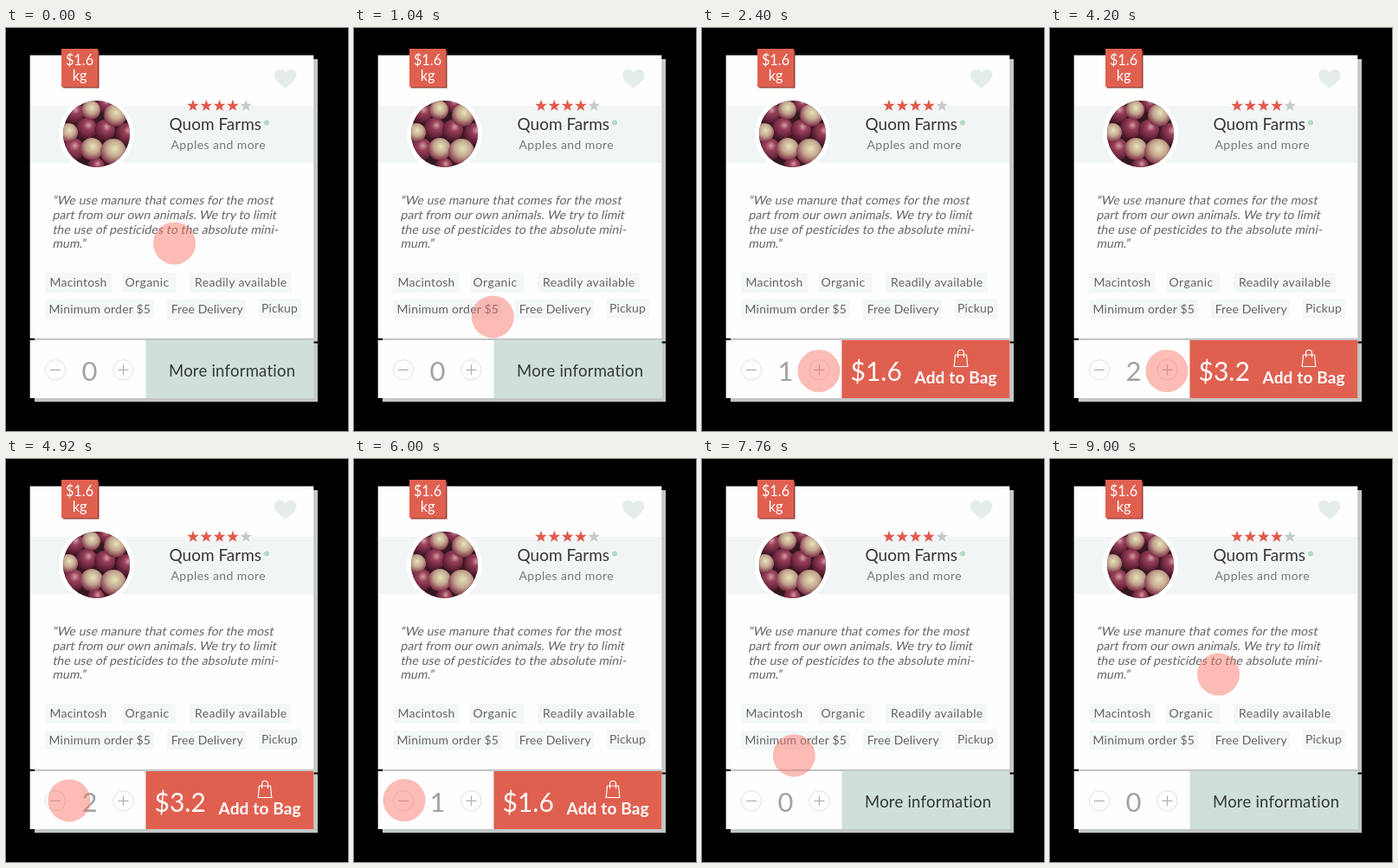
These frames come from a looping animation (395x466 px, 9.04 s). An HTML page:

```html
<!DOCTYPE html>
<html lang="en">
<head>
<meta charset="utf-8">
<title>Product card</title>
<style>
html, body { margin: 0; width: 100%; height: 100%; overflow: hidden; background: #000; }
svg { display: block; width: 395px; height: 466px; font-family: Lato, sans-serif; }
</style>
</head>
<body>
<svg id="stage" viewBox="0 0 395 466" xmlns="http://www.w3.org/2000/svg">
  <defs>
    <clipPath id="round"><circle cx="104.5" cy="122.5" r="38.5"/></clipPath>
    <radialGradient id="red" cx=".6" cy=".35" r=".62">
      <stop offset="0" stop-color="#d3a0a4"/>
      <stop offset=".35" stop-color="#98405a"/>
      <stop offset="1" stop-color="#551a30"/>
    </radialGradient>
    <radialGradient id="pale" cx=".55" cy=".38" r=".62">
      <stop offset="0" stop-color="#e6e3b8"/>
      <stop offset=".5" stop-color="#c4a690"/>
      <stop offset="1" stop-color="#7a2a42"/>
    </radialGradient>
  </defs>
  <rect width="395" height="466"/>

  <!-- card: two shadows, two sheets -->
  <path fill="#c3c7c6" d="M33 364.5H360V432.3H33ZM33 36H360V362.5H33Z"/>
  <path fill="#fefefe" d="M27.700 361H355.300V428H27.700ZM27.700 31.400H355.300V358.800H27.700Z"/>
  <path fill="#f2f5f6" d="M28 90H355V156H28Z"/>

  <!-- price tag -->
  <path fill="#8f4037" d="M66 26H107.500V69.600H66Z"/>
  <path fill="#e06050" d="M64 24H106V68.300H64Z"/>
  <g fill="#fff" font-size="16.3" text-anchor="middle">
    <text x="85" y="42.700">$1.6</text>
    <text x="85" y="61">kg</text>
  </g>

  <!-- round picture -->
  <circle cx="104.5" cy="122.5" r="43.5" fill="#fff"/>
  <g id="fruit" clip-path="url(#round)"><rect x="64" y="82" width="82" height="82" fill="#35181f"/></g>

  <path fill="#e5ecec" d="M322.7 70C317 65 310 60.500 310 54.300C310 46.800 319.300 45.300 322.700 51.500C326.100 45.300 335.400 46.800 335.400 54.300C335.400 60.500 328.400 65 322.700 70Z"/>
  <g id="stars"></g>
  <circle cx="301" cy="109.500" r="3" fill="#b0dcc2"/>

  <g id="labels"></g>

  <!-- stepper -->
  <g fill="none" stroke="#dde0e1">
    <circle cx="57" cy="395.300" r="11.7"/>
    <circle cx="135.500" cy="395.300" r="11.7"/>
    <path stroke="#b2afae" stroke-width="1.2" d="M51 395.300H63M129.500 395.300H141.500M135.500 389.300V401.300"/>
  </g>
  <g fill="#a0a3a4" font-size="31" text-anchor="middle">
    <text id="n0" x="96.500" y="407.500">0</text>
    <text id="n1" x="96.500" y="407.500">1</text>
    <text id="n2" x="96.500" y="407.500">2</text>
  </g>

  <!-- action panel -->
  <path fill="#cfe0da" d="M161.500 361H355.300V428H161.500Z"/>
  <text x="188" y="402.600" font-size="18.5" letter-spacing=".24" fill="#353737">More information</text>
  <g id="buy" fill="#fff">
    <path fill="#e06050" d="M161.500 361H355.300V428H161.500Z"/>
    <g font-size="30">
      <text id="one" x="171.500" y="408">$1.6</text>
      <text id="two" x="171.500" y="408">$3.2</text>
    </g>
    <g fill="none" stroke="#fff" stroke-width="1.2" stroke-linejoin="round">
      <path d="M292.500 378H305.500L306.800 391.500H291.200Z"/>
      <path d="M295.500 381V376C295.500 371 302.500 371 302.500 376V381"/>
    </g>
    <text x="245.500" y="411" font-size="19" font-weight="700" letter-spacing=".15">Add to Bag</text>
  </g>

  <circle id="touch" r="24.5" fill="#f67367" fill-opacity=".48"/>
</svg>
<script>
const LOOP = 9040, STEP = 40;
const $ = id => document.getElementById(id);

function add(parent, tag, attrs, text) {
  const el = document.createElementNS("http://www.w3.org/2000/svg", tag);
  for (const k in attrs) el.setAttribute(k, attrs[k]);
  if (text) el.textContent = text;
  $(parent).appendChild(el);
}

function label(text, x, y, size, spacing, fill, extra) {
  add("labels", "text", { x, y, "font-size": size, "letter-spacing": spacing, fill, ...extra }, text);
}

// left, top, width, height of the chip, then its text
function chip(x, y, w, h, text, tx, ty, spacing) {
  add("labels", "rect", { x, y, width: w, height: h, fill: "#f4f7f8" });
  label(text, tx, ty, 14, spacing, "#626566");
}

function star(cx, cy, fill) {
  let points = "";
  for (let i = 0; i < 10; i++) {
    const r = i % 2 ? 2.9 : 7.2, a = i * Math.PI / 5;
    points += `${cx + r * Math.sin(a)},${cy - r * Math.cos(a)} `;
  }
  add("stars", "polygon", { points, fill });
}

for (let i = 0; i < 5; i++) star(216 + i * 15.3, 90, i < 4 ? "#e05a4c" : "#c4cacb");

function apple(cx, cy, r, tone) {
  add("fruit", "circle", { cx, cy, r, fill: `url(#${tone})` });
}
[[78, 98, 12], [114, 88, 10], [93, 116, 12], [114, 118, 12], [139, 122, 12],
 [77, 140, 13], [104, 160, 10]].forEach(a => apple(...a, "red"));
[[98, 95, 11], [126, 101, 13], [72, 121, 11], [99, 140, 13], [124, 143, 15]]
  .forEach(a => apple(...a, "pale"));

label("Quom Farms", 188.500, 118, 19, 0, "#353737");
label("Apples and more", 190.500, 140, 14, .42, "#747879");

[["“We use manure that comes for the most", 204, .11],
 ["part from our own animals. We try to limit", 221, .05],
 ["the use of pesticides to the absolute mini-", 238, .1],
 ["mum.”", 254, .1]].forEach(([text, y, spacing]) =>
  label(text, 0, 0, 14, spacing, "#606465", { transform: `translate(53.5 ${y}) skewX(-12)` }));

chip(45, 283, 77, 23, "Macintosh", 50.500, 299, .2);
chip(134.500, 283, 62, 23, "Organic", 137.500, 299, .45);
chip(212, 283, 118, 23, "Readily available", 218, 299, .35);
chip(45, 314, 126, 22, "Minimum order $5", 49.500, 330, .2);
chip(186, 314, 91, 22, "Free Delivery", 190.700, 330, .1);
chip(292, 313, 49, 23, "Pickup", 295, 329, .15);

const ramp = (t, a, b) => Math.min(1, Math.max(0, (t - a) / (b - a)));
const fade = (id, v) => $(id).setAttribute("opacity", v);

const home = [194.500, 249], plus = [135, 396.500], minus = [58, 394.500];
const moves = [
  [280, 1600, home, plus],
  [4340, 5060, plus, minus],
  [7080, 9000, minus, home]
];

function draw(t) {
  const [a, b, from, to] = moves.filter(m => t >= m[0]).pop() || moves[0];
  const p = ramp(t, a, b);
  $("touch").setAttribute("cx", from[0] + (to[0] - from[0]) * p);
  $("touch").setAttribute("cy", from[1] + (to[1] - from[1]) * p);

  const zero = 1 - ramp(t, 1640, 1960) + ramp(t, 6560, 6880);
  const two = ramp(t, 3440, 3760) - ramp(t, 5240, 5560);
  fade("n0", zero);
  fade("n1", 1 - zero - two);
  fade("n2", two);
  fade("one", 1 - two);
  fade("two", two);
  fade("buy", ramp(t, 2080, 2360) - ramp(t, 6560, 6880));
}

const start = performance.now();
function tick() {
  const t = (performance.now() - start) % LOOP;
  draw(Math.floor(t / STEP) * STEP);
  requestAnimationFrame(tick);
}
tick();
</script>
</body>
</html>
```
